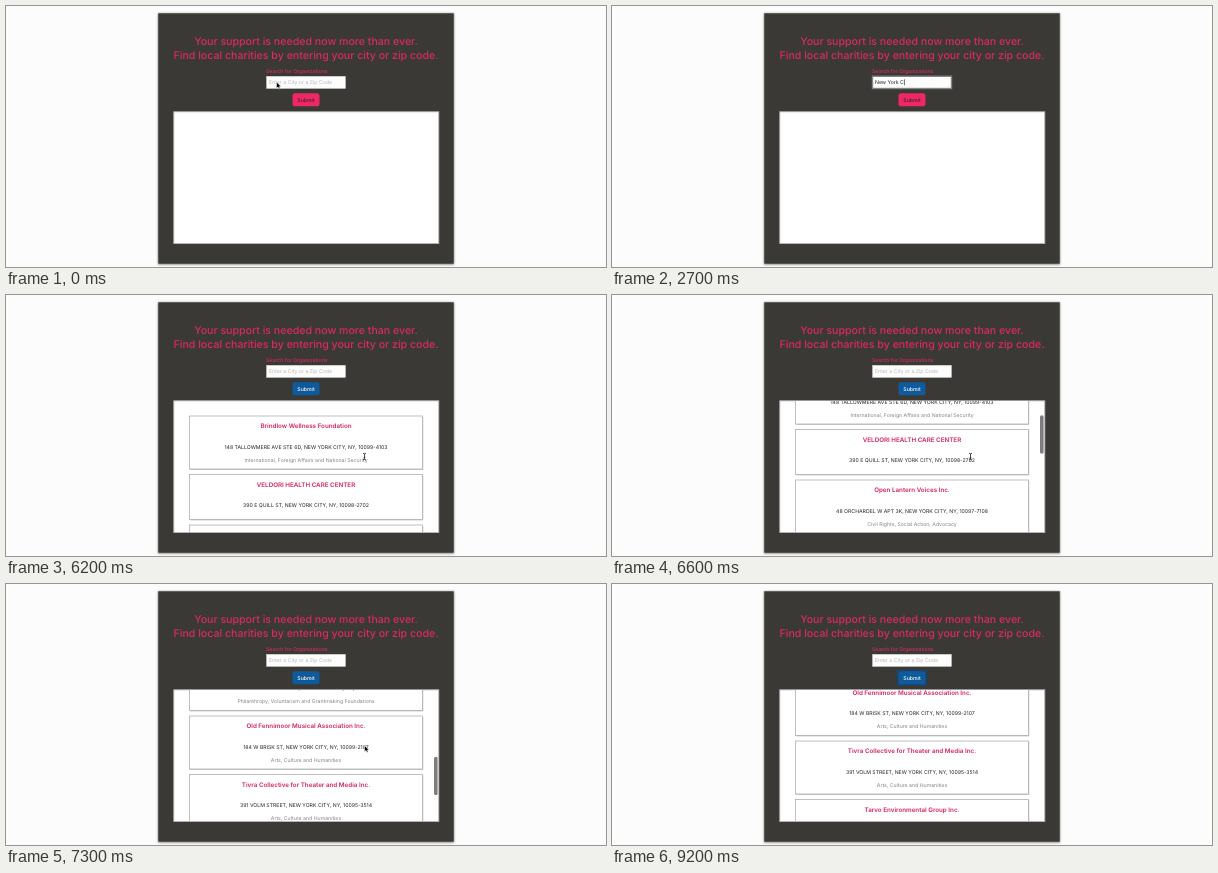
An HTML page for the animation above (9300 ms loop, 600 px wide and 261 px high).

```html
<!DOCTYPE html>
<html lang="en">
<head>
<meta charset="utf-8">
<title>Charity search</title>
<style>
  html, body { margin: 0; width: 100%; height: 100%; overflow: hidden; background: #fcfcfc; }
  svg { display: block; width: 600px; height: 261px; }
  text { font-family: Inter, "Open Sans", sans-serif; font-size: 5.2px; text-rendering: geometricPrecision; }
  .mid { text-anchor: middle; }
  .head { font-size: 10.6px; font-weight: 500; fill: #d92b60; }
  .label { fill: #d92b60; font-weight: 500; }
  .name { font-size: 6.25px; font-weight: 600; fill: #d3245a; }
  .addr { fill: #222; }
  .cause { fill: #858585; }
  .card { fill: #fff; stroke: #a4a4a4; stroke-width: .7; }
</style>
</head>
<body>
<svg viewBox="0 0 600 261">
  <defs>
    <clipPath id="pane"><rect x="168" y="106" width="264.5" height="131"/></clipPath>
    <filter id="soft" x="-5%" y="-5%" width="110%" height="110%"><feGaussianBlur stdDeviation=".9"/></filter>
  </defs>
  <rect x="152" y="7.5" width="296" height="251" fill="#777" filter="url(#soft)"/>
  <rect x="152.3" y="7.3" width="295.4" height="250.4" fill="#3a3935"/>
  <text class="head mid" x="300" y="38.6">Your support is needed now more than ever.</text>
  <text class="head mid" x="300" y="52.5">Find local charities by entering your city or zip code.</text>
  <text class="label" x="260" y="67.4">Search for Organizations</text>

  <rect id="field" x="260.5" y="70.3" width="79" height="12.2" fill="#fdfdfd"/>
  <text id="entry" x="263" y="78" xml:space="preserve"></text>
  <rect id="caret" y="73.3" width=".6" height="6" fill="#222"/>

  <rect id="ring" x="284.7" y="85.8" width="30.4" height="16" rx="1" fill="#1d4468"/>
  <rect id="button" x="286.5" y="87.3" width="27" height="13" rx="2.6"/>
  <text id="submit" class="mid" x="300" y="95.7" font-weight="500">Submit</text>

  <rect x="167.8" y="105.8" width="265" height="131.7" fill="#fff" stroke="#b5b5b5" stroke-width=".9"/>
  <g clip-path="url(#pane)">
    <g id="list"></g>
    <rect id="thumb" x="428" width="3.6" height="38.5" rx="1.8" fill="#7d7d7d"/>
  </g>

  <g id="cursor">
    <path id="arrow" d="M0 0V6.3L1.5 5 2.5 7.1 3.6 6.6 2.7 4.6H4.6Z" fill="#000" stroke="#fff" stroke-width=".5"/>
    <path id="beam" d="M-1.5 -3.2Q0 -3.2 0 -2.2Q0 -3.2 1.5 -3.2M0 -2.4V2.6M-1.5 3.4Q0 3.4 0 2.4Q0 3.4 1.5 3.4M-.8 .9H.8" fill="none" stroke="#222" stroke-width=".8"/>
    <path id="hand" d="M-1.2 -3.2Q-.4 -4 .3 -3.2L.8 -1 3 -.4Q3.9 0 3.7 1.2L3 4H-.4L-2.5 1.2Q-2.9 .2 -1.8 .4L-.7 1Z" fill="#fff" stroke="#222" stroke-width=".5"/>
  </g>
</svg>
<script>
const LOOP = 9300, STEP = 100;
const $ = id => document.getElementById(id);
const set = (el, attrs) => { for (const k in attrs) el.setAttribute(k, attrs[k]); };
const show = (el, on) => set(el, { visibility: on ? "visible" : "hidden" });

const CITY = "NEW YORK CITY, NY, ";
const ARTS = "Arts, Culture and Humanities";
const cards = [
  ["Brindlow Wellness Foundation", "148 TALLOWMERE AVE STE 6D", "10099-4103", "International, Foreign Affairs and National Security"],
  ["VELDORI HEALTH CARE CENTER", "390 E QUILL ST", "10098-2702", ""],
  ["Open Lantern Voices Inc.", "48 ORCHARDEL W APT 3K", "10097-7108", "Civil Rights, Social Action, Advocacy"],
  ["Dorvane Family Foundation", "410 LANTERNEL ROW WEST", "10096-1413", "Philanthropy, Voluntarism and Grantmaking Foundations"],
  ["Old Fennimoor Musical Association Inc.", "184 W BRISK ST", "10099-2107", ARTS],
  ["Tivra Collective for Theater and Media Inc.", "391 VOLM STREET", "10095-3514", ARTS],
  ["Tarvo Environmental Group Inc.", "62 HOLLOWBY STREET", "10094-1806", "Environment"]
];

function add(parent, tag, attrs, label) {
  const el = document.createElementNS("http://www.w3.org/2000/svg", tag);
  set(el, attrs);
  if (label) el.textContent = label;
  parent.append(el);
}

function buildList(list) {
  let y = 121;
  for (const [name, street, zip, cause] of cards) {
    const height = cause ? 53 : 45;
    const line = (cls, dy, label) => add(list, "text", { class: cls + " mid", x: 300, y: y + dy }, label);
    add(list, "rect", { x: 184.3, y: y + .9, width: 233, height, fill: "#c9c9c9" });
    add(list, "rect", { class: "card", x: 183.6, y, width: 233, height });
    line("name", 12.4, name);
    line("addr", 32.8, street + ", " + CITY + zip);
    if (cause) line("cause", 45.5, cause);
    y += height + 5.5;
  }
}

// Linear interpolation through [time, ...values] rows.
function track(rows, t) {
  const i = rows.findIndex(r => r[0] > t);
  if (i === 0) return rows[0].slice(1);
  if (i < 0) return rows[rows.length - 1].slice(1);
  const a = rows[i - 1], b = rows[i], k = (t - a[0]) / (b[0] - a[0]);
  return a.slice(1).map((v, j) => v + (b[j + 1] - v) * k);
}

const QUERY = "New York City";
const keys = [1000, 1200, 1300, 1500, 1700, 1900, 2100, 2200, 2400, 2700, 3000, 3100, 3200];
const path = [
  [0, 270.5, 76], [600, 270.5, 76], [900, 270, 57], [3600, 270, 57], [4000, 282, 74],
  [4400, 298, 93], [5200, 298, 93], [5600, 323, 123], [5900, 349, 153], [6100, 358.5, 161.5],
  [8000, 358.5, 161.5], [8500, 415, 140], [8900, 480, 100], [9100, 480, 16]
];
const scroll = [
  [6300, 0], [6400, 5], [6500, 21], [6600, 45], [7000, 147], [7100, 172], [7200, 195],
  [7300, 215], [7400, 230], [7500, 240], [7600, 246.5], [7700, 248], [7800, 248.5]
];
const shapes = [
  [0, "arrow"], [200, "beam"], [1000, ""], [3700, "beam"], [4100, "arrow"], [4300, "hand"],
  [5400, "arrow"], [6000, "beam"], [7300, "arrow"], [9200, ""]
];

function render(t) {
  const focused = t >= 200 && t < 4600;
  const typed = t < 4700 ? keys.filter(k => k <= t).length : 0;
  const entry = $("entry");
  entry.textContent = typed ? QUERY.slice(0, typed) : "Enter a City or a Zip Code";
  set(entry, { fill: typed ? "#222" : "#b9b9b9" });
  set($("field"), { stroke: focused ? "#858585" : "#d8d8d8", "stroke-width": focused ? 1.4 : .4 });
  set($("caret"), { x: 263.2 + (typed ? entry.getComputedTextLength() : 0) });
  show($("caret"), focused);

  const hover = t >= 4300;
  set($("button"), { fill: t >= 4600 ? "#0f5a9b" : hover ? "#cf164c" : "#ee2765" });
  set($("submit"), { fill: hover ? "#fff" : "#4a1d2c" });
  show($("ring"), t >= 9000);

  const [y] = track(scroll, t);
  set($("list"), { transform: `translate(0 ${-y})` });
  show($("list"), t >= 5000);
  set($("thumb"), { y: 106.5 + y * .308 });
  show($("thumb"), t >= 6400 && t < 8300);

  set($("cursor"), { transform: `translate(${track(path, t)})` });
  const shape = shapes.filter(s => s[0] <= t).pop()[1];
  for (const id of ["arrow", "beam", "hand"]) show($(id), id === shape);
}

buildList($("list"));
const start = performance.now();
function tick() {
  const t = (performance.now() - start) % LOOP;
  render(Math.floor(t / STEP) * STEP);
  requestAnimationFrame(tick);
}
tick();
</script>
</body>
</html>
```
